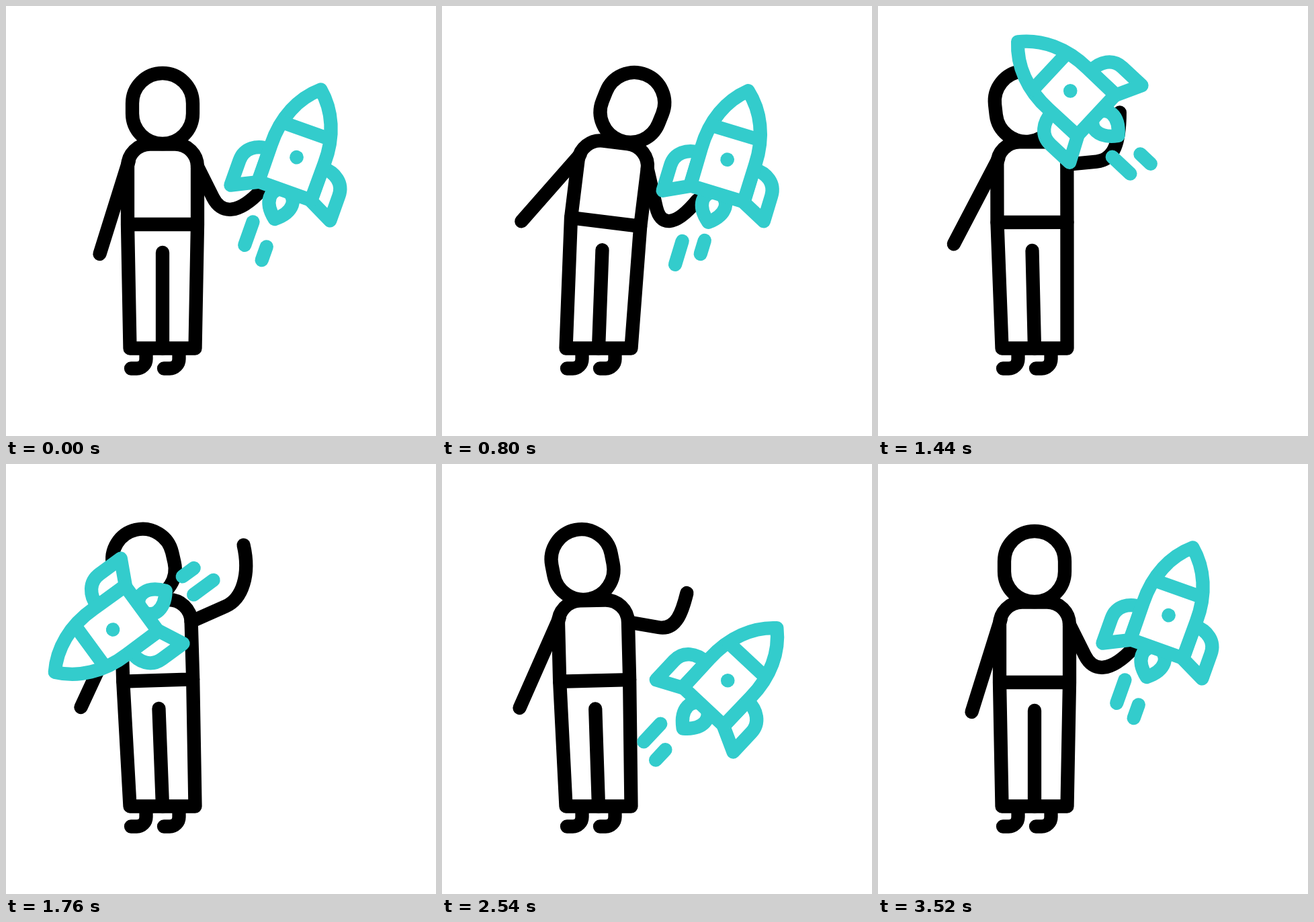
Write an HTML page with a canvas that moves like this. It is 640 px wide and 640 px high and loops after 3600 ms.

```html
<!DOCTYPE html>
<html lang="en">
<head>
<meta charset="utf-8">
<title>Rocket throw</title>
<style>
  html, body { margin: 0; width: 100%; height: 100%; overflow: hidden; background: #fff; }
  canvas { display: block; }
</style>
</head>
<body>
<canvas id="stage" width="640" height="640"></canvas>
<script>
const ctx = document.getElementById('stage').getContext('2d');
const LOOP = 3600, INK = '#000', TEAL = '#33cccc';
const ORBIT = { x: 298, y: 264, radius: 140 };

// Each body part is [x, y, tilt] or [x, y]
const BODY = {
  rest:   { waist: [233, 325, 0],       head: [233, 152.5, 0],  leftHand: [139.5, 369] },
  crouch: { waist: [244.2, 321.5, 7.3], head: [286, 151, 23],   leftHand: [118.5, 319] },
  thrown: { waist: [226.2, 322, -1.7],  head: [205, 149, -13],  leftHand: [111.5, 362] }
};

// Right arm: elbow, bend of the forearm, hand
const ARM = {
  rest:   [308, 285, 345, 312, 381, 273],
  crouch: [319, 300, 345, 331, 380, 289],
  thrown: [327, 212, 364, 165, 354, 121],
  caught: [316, 286, 352, 294, 382, 288]
};

// Rocket along its orbit: time, orbit angle, heading
const FLIGHT = [
  [90, 16.1, 19.6], [460, 11.3, 19.3], [620, 11.3, 19.3], [1100, 35.7, 4.5],
  [1760, 172.6, -126], [2220, 286.2, -283.8], [2900, 367, -334.9], [3490, 376.1, -340.4]
];

const rad = deg => deg * Math.PI / 180;
const mix = (a, b, k) => a.map((v, i) => v + (b[i] - v) * k);

function ease(t, from, to) {
  const p = Math.min(1, Math.max(0, (t - from) / (to - from)));
  return p * p * (3 - 2 * p);
}

const pulse = (t, rise, top, drop, end) => ease(t, rise, top) - ease(t, drop, end);

// Smooth monotone curve through key points
function along(keys, t, col) {
  const last = keys.length - 1;
  if (t <= keys[0][0]) return keys[0][col];
  if (t >= keys[last][0]) return keys[last][col];
  const rate = k => (keys[k + 1][col] - keys[k][col]) / (keys[k + 1][0] - keys[k][0]);
  const slope = k => {
    if (k === 0 || k === last) return 0;
    const a = rate(k - 1), b = rate(k);
    return a * b > 0 ? 2 * a * b / (a + b) : 0;
  };
  const i = keys.findIndex(key => key[0] > t) - 1;
  const h = keys[i + 1][0] - keys[i][0], u = (t - keys[i][0]) / h, v = 1 - u;
  return v * v * ((1 + 2 * u) * keys[i][col] + u * h * slope(i)) +
         u * u * ((3 - 2 * u) * keys[i + 1][col] - v * h * slope(i + 1));
}

function placed(x, y, deg, draw) {
  ctx.save();
  ctx.translate(x, y);
  ctx.rotate(rad(deg));
  draw();
  ctx.restore();
}

function line(...pts) {
  ctx.beginPath();
  for (let i = 0; i < pts.length; i += 2) ctx.lineTo(pts[i], pts[i + 1]);
  ctx.stroke();
}

function turned([x, y], cx, cy, deg) {
  const cos = Math.cos(rad(deg)), sin = Math.sin(rad(deg));
  return [cx + (x - cx) * cos - (y - cy) * sin, cy + (x - cx) * sin + (y - cy) * cos];
}

const headShape = new Path2D();
headShape.roundRect(-45, -52.5, 90, 105, 45);
const torsoShape = new Path2D('M-52 0V-86A33.5 33.5 0 0 1 -18.5 -119.5H18.5A33.5 33.5 0 0 1 52 -86V0Z');
const footShape = new Path2D('M208.5 512V525.5A14 14 0 0 1 194.5 539.5H186');
const hullShape = new Path2D('M0 -107C27 -84 43 -48 42 -5L41.5 53H-41.5L-42 -5C-43 -48 -27 -84 0 -107Z');
const finShape = new Path2D('M42 2C62 2 78.5 13 78.5 33V72L42 54Z');
const flameShape = new Path2D('M0 97.5C-12 88 -17.5 79 -17.5 69A17.5 17.5 0 0 1 17.5 69C17.5 79 12 88 0 97.5Z');

function drawRightArm(t, shoulder) {
  const [sx, sy] = shoulder;
  const caught = ease(t, 2240, 2880);
  let arm = mix(ARM.rest, ARM.crouch, ease(t, 90, 460));
  arm = mix(arm, ARM.thrown, ease(t, 1010, 1630));
  arm = mix(arm, ARM.caught, caught);
  arm = mix(arm, ARM.rest, ease(t, 2900, 3490));
  const drift = -6 * ease(t, 1700, 2250) * (1 - caught);
  const [elbow, bend, hand] = [0, 2, 4].map(i => turned(arm.slice(i, i + 2), sx, sy, drift));

  const [ex, ey] = elbow, reach = 27 / Math.hypot(ex - sx, ey - sy);
  ctx.beginPath();
  ctx.moveTo(sx, sy);
  ctx.lineTo(ex, ey);
  ctx.bezierCurveTo(ex + (ex - sx) * reach, ey + (ey - sy) * reach, ...bend, ...hand);
  ctx.stroke();
}

function drawPerson(t) {
  const part = name => {
    const wound = mix(BODY.rest[name], BODY.crouch[name], ease(t, 90, 460));
    const released = mix(wound, BODY.thrown[name], ease(t, 690, 1720));
    return mix(released, BODY.rest[name], ease(t, 2240, 3500));
  };
  const [wx, wy, tilt] = part('waist');
  const onTorso = (x, y) => turned([wx + x, wy + y], wx, wy, tilt);

  ctx.strokeStyle = INK;
  placed(...part('head'), () => ctx.stroke(headShape));
  placed(wx, wy, tilt, () => ctx.stroke(torsoShape));
  ctx.stroke(footShape);
  placed(49, 0, 0, () => ctx.stroke(footShape));
  line(...onTorso(-52, 0), 184.5, 509.5, 281.5, 509.5, ...onTorso(52, 0));
  line(...onTorso(0, 42), 233, 509.5);
  line(...onTorso(-50, -95), ...part('leftHand'));
  drawRightArm(t, onTorso(52, -86));
}

function drawRocket(t) {
  const shell = shape => { ctx.fill(shape); ctx.stroke(shape); };
  ctx.strokeStyle = TEAL;
  ctx.fillStyle = '#fff';
  shell(flameShape);
  shell(finShape);
  ctx.save();
  ctx.scale(-1, 1);
  shell(finShape);
  ctx.restore();
  shell(hullShape);
  line(-37, -42, 37, -42);

  ctx.fillStyle = TEAL;
  ctx.beginPath();
  ctx.arc(0, 0, 10.3, 0, Math.PI * 2);
  ctx.fill();

  // The two exhaust dashes slide past each other
  const slide = pulse(t, 90, 770, 990, 1470) + pulse(t, 1470, 1950, 1950, 2440) +
                pulse(t, 2440, 2900, 2900, 3400);
  const longY = 112.5 + 23 * slide, shortY = 140.5 - 15.5 * slide;
  line(-29, longY, -29, longY + 36.5);
  line(2.5, shortY, 2.5, shortY + 21);
}

function render(t) {
  ctx.fillStyle = '#fff';
  ctx.fillRect(0, 0, 640, 640);
  ctx.lineWidth = 20.3;
  ctx.lineCap = ctx.lineJoin = 'round';
  drawPerson(t);

  const angle = rad(along(FLIGHT, t, 1));
  const radius = ORBIT.radius - 8.5 * pulse(t, 90, 460, 1010, 1630);
  placed(ORBIT.x + radius * Math.cos(angle), ORBIT.y - radius * Math.sin(angle),
         along(FLIGHT, t, 2), () => drawRocket(t));
}

const start = performance.now();
function tick(now) {
  render(Math.max(0, now - start) % LOOP);
  requestAnimationFrame(tick);
}
render(0);
requestAnimationFrame(tick);
</script>
</body>
</html>
```
